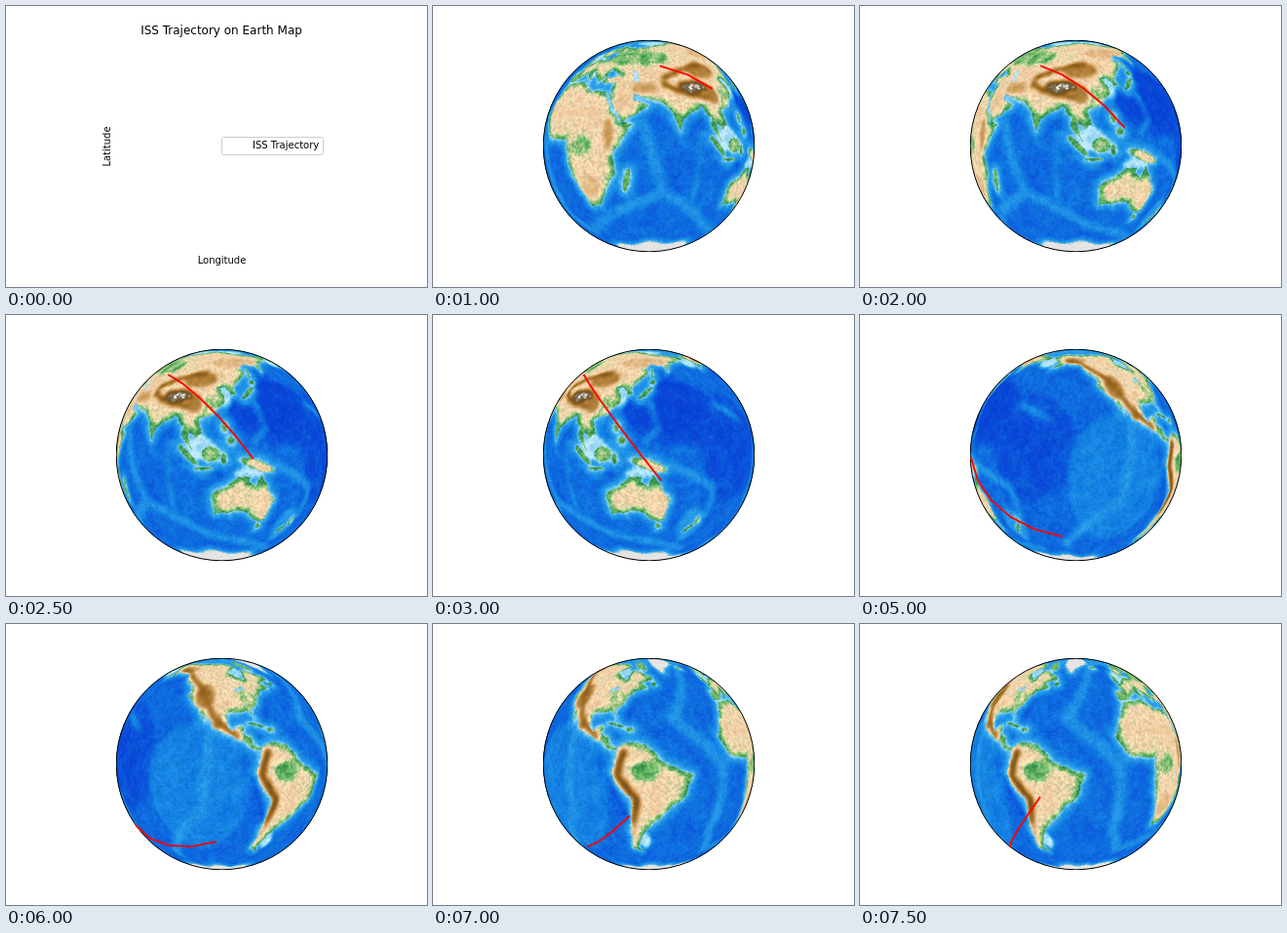
An HTML page with a canvas that plays this animation: 432x288 px, repeating every 8000 ms.

```html
<!DOCTYPE html>
<html lang="en">
<head>
<meta charset="utf-8">
<title>ISS Trajectory</title>
<style>
  html, body { margin: 0; width: 100%; height: 100%; overflow: hidden; background: #fff; }
  svg, canvas { position: absolute; left: 0; top: 0; }
  text { font-family: "DejaVu Sans", sans-serif; font-size: 10px; }
</style>
</head>
<body>
<canvas id="globe" width="432" height="288"></canvas>
<svg width="432" height="288" viewBox="0 0 432 288">
  <clipPath id="axes"><rect x="113" y="35" width="217" height="217"/></clipPath>
  <g id="labels">
    <text x="221" y="29" text-anchor="middle" style="font-size:12px">ISS Trajectory on Earth Map</text>
    <text x="221.5" y="264" text-anchor="middle">Longitude</text>
    <text transform="translate(107 144) rotate(-90)" text-anchor="middle">Latitude</text>
    <g id="legend">
      <rect x="221.5" y="134.5" width="104" height="18" rx="2" fill="#fff" stroke="#ccc"/>
      <text x="253" y="146">ISS Trajectory</text>
    </g>
  </g>
  <g id="overlay" clip-path="url(#axes)" fill="none">
    <circle cx="221.5" cy="143.5" r="108.3" stroke="#000"/>
    <path id="track" stroke="#f00" stroke-width="1.9" stroke-linejoin="round" stroke-linecap="square"/>
  </g>
</svg>
<script>
const RAD = Math.PI / 180, STEP = 500, STEPS = 16;
const CX = 221.5, CY = 143.5, R = 108.3;
const PX = 3, WEST = -40, TURN = 360 * PX, W = 400 * PX, H = 180 * PX;   // map texture, pixels per degree
const $ = id => document.getElementById(id);

function hash(x, y, seed) {
  let n = (x * 374761393 + y * 668265263 + seed * 69069) | 0;
  n = Math.imul(n ^ (n >>> 13), 1274126177);
  return ((n ^ (n >>> 16)) >>> 0) / 2 ** 32;
}

// Paths repeat after 360 degrees so the map wraps.
function addWrapped(target, path) {
  target.addPath(path);
  target.addPath(path, { a: 1, b: 0, c: 0, d: 1, e: 360, f: 0 });
  return target;
}
const wrapped = path => addWrapped(new Path2D(), path);
function ellipse(lon, lat, rx, ry, angle = 0) {
  const path = new Path2D();
  path.ellipse(lon, lat, rx, ry, angle * RAD, 2 * Math.PI, 0, true);
  return path;
}

// A few lon,lat corners become a ragged coast by midpoint displacement.
function coast(corners) {
  let pts = corners.split(" ").map(p => p.split(",").map(Number));
  for (let pass = 1; pass <= 3; pass++) {
    pts = pts.flatMap(([x, y], i) => {
      const [u, v] = pts[(i + 1) % pts.length];
      const s = (hash(Math.round(x * 10), Math.round(y * 10), pass) - 0.5) * 0.25 * Math.min(1, 8 / Math.hypot(u - x, v - y));
      return [[x, y], [(x + u) / 2 - (v - y) * s, (y + v) / 2 + (u - x) * s]];
    });
  }
  return new Path2D("M" + pts.join(" ") + "Z");
}

const eurasia = "-9,37 -9,43 -2,43.5 -4,48.5 8,54 11,54 21,55 29,60 22,60.5 25,65.5 17,62 14,55.5 6,58 5,62 25,71 40,67 33,66 60,69 104,77 140,72.5 190,66 163,60 157,51 156,58 142,59 135,54.5 140,51 127.5,39.5 129,35 126,35 121.5,40 118,39 122,31 114,22.5 106,20 109,12 105,9 100.5,13.5 104,1.5 98,9 98,15 92,22.5 80,15 77.5,8 72.5,20 66.5,25 50,30 51,25 59.5,22.5 45,13 35,28 36,36.5 27,37 28,41 41,41.5 31,46.5 23,37 13,45.5 16,38 9,44 -1,37.5";
const africa = "-6,35.8 10,37 20,31 32,31 37,20 43,12 51,12 40,-3 40.5,-15 35,-22 27,-34 19,-34.5 12,-17 9,-1 9,4 -8,4.5 -17,14.7 -9.5,32";
const australia = "114,-22 122,-18 130,-12 136,-12 135.5,-15 140.5,-17.6 142.5,-11 145.5,-15 153,-26 150,-37.5 146,-39 138,-34.5 131,-31.5 124,-33.5 115,-34";
const northAmerica = "-168,65.7 -156,71 -95,70 -82,67 -94,59 -80,52 -78,62 -65,58.5 -56,53 -66,50 -61,46 -70,43.5 -76,36 -81.5,31 -80,25.5 -83,30 -97,28 -97,21 -94,18 -87,21 -88,16 -83.5,15 -83,10 -77.5,8 -82,8 -95,16 -105,20 -113,31 -110,23 -118,34 -124,40 -124,48 -136,58.5 -150,60 -164,54.7 -158,59";
const southAmerica = "-77.5,9 -72,12 -62,10.5 -50,0 -35,-6 -39,-18 -48.5,-26 -58,-35 -65,-43 -69,-51 -66,-55 -74,-52 -71,-30 -70.3,-18 -76,-14 -81,-5 -78,2";
const greenland = "-60,82 -20,81 -22,71 -40,65 -44,60 -53,66 -58,75";
const islands = [
  [114, 0.5, 5, 4], [140, -5.5, 10, 2.6, -18], [101, 0, 7.5, 1.6, -45], [110, -7.4, 5, 0.8], [121, -2, 1.5, 3],
  [121.5, 15.5, 1.4, 3], [125, 8, 2, 2], [138, 36, 6, 1.3, 40], [143, 43.3, 2, 1.4], [142.7, 50, 0.8, 4],
  [175.5, -38.5, 1.3, 3], [170.5, -43.8, 4, 1.2, 42], [146.7, -42, 1.6, 1.5], [47, -19, 1.8, 6.5, -15],
  [-2.5, 53.5, 2, 4], [-19, 65, 4, 1.4], [-79.5, 21.7, 5, 0.7, -15], [-71, 19, 2.3, 0.9], [-72, 68, 11, 3, -30], [-56, 49, 2, 1.5]
];

const land = new Path2D(), caps = new Path2D();
for (const d of [eurasia, africa, australia, northAmerica, southAmerica]) addWrapped(land, coast(d));
for (const island of islands) addWrapped(land, ellipse(...island));
addWrapped(caps, coast(greenland));
let antarctica = "M-40,-90";
for (let lon = -40; lon <= 360; lon += 3)
  antarctica += ` ${lon},${-70.5 + 4.5 * Math.sin(lon * RAD) + 2 * Math.sin(lon * 0.13)}`;
caps.addPath(new Path2D(antarctica + " 360,-90Z"));

// Elevation is painted in greys: below 148 is sea, above is land.
const grey = v => `rgb(${v},${v},${v})`;
function layer(level) {
  const canvas = document.createElement("canvas");
  canvas.width = W; canvas.height = H;
  const c = canvas.getContext("2d", { willReadFrequently: true });
  if (level) { c.fillStyle = grey(level); c.fillRect(0, 0, W, H); }
  c.lineJoin = c.lineCap = "round";
  c.setTransform(PX, 0, 0, -PX, -WEST * PX, H / 2);
  return c;
}
function fill(c, path, level) { c.fillStyle = grey(level); c.fill(path); }
function stroke(c, path, level, width) { c.strokeStyle = grey(level); c.lineWidth = width; c.stroke(path); }
function line(c, level, width, d) { stroke(c, wrapped(new Path2D("M" + d)), level, width); }
function blob(c, level, ...shape) { fill(c, wrapped(ellipse(...shape)), level); }
function blend(c, source, blur) {
  c.save();
  c.setTransform(1, 0, 0, 1, 0, 0);
  c.filter = `blur(${blur}px)`;
  c.drawImage(source.canvas, 0, 0);
  c.restore();
}

function paintSea(map) {
  const sea = layer(72);
  blob(sea, 50, 155, 25, 30, 20);
  blob(sea, 58, 195, 5, 25, 30);
  blob(sea, 88, -115, -15, 30, 38);
  blob(sea, 110, 0, 78, 400, 9);
  blob(sea, 108, 170, -42, 8, 12);
  line(sea, 100, 7, "-25,62 -45,25 -15,0 -13,-40 0,-54 68,-26");
  line(sea, 98, 6, "57,13 68,-25 110,-49 180,-62");
  line(sea, 100, 3, "90,8 88,-30");
  line(sea, 106, 6, "-106,20 -112,-25 -150,-57");
  line(sea, 105, 2.5, "-176,29 -155,19");
  line(sea, 105, 3, "140,34 146,14 138,8");
  line(sea, 108, 4, "152,-5 180,-18 181,-34");
  stroke(sea, land, 104, 8);
  stroke(sea, caps, 100, 10);
  for (const trench of ["143,33 148,13", "145,40 160,50", "97,-1 120,-11", "-72,-33 -82,-8"]) line(sea, 38, 2, trench);
  blend(map, sea, 5);

  const shelf = layer();
  stroke(shelf, land, 138, 2.5);
  stroke(shelf, caps, 140, 3);
  const shallows = [[109, 4, 7, 7], [135, -10, 9, 3], [188, 60, 9, 5], [122, 33, 4, 6], [-62, -47, 4, 6], [-86, 60, 6, 5], [3, 56, 4, 5], [100, 75, 65, 4]];
  for (const s of shallows) blob(shelf, 145, ...s);
  blend(map, shelf, 3);
}

function paintRelief(map) {
  const relief = layer(179);
  stroke(relief, land, 153, 5);
  const regions = [
    [158, -62, -4, 8, 6], [160, 50, 57, 32, 8], [158, 20, 0, 7, 6], [162, 112, 28, 7, 6], [162, -82, 38, 7, 7],
    [182, 12, 23, 25, 7], [182, 46, 24, 8, 8], [188, 23, -22, 8, 9], [203, 37, 6, 3, 10], [203, 57, 33, 9, 4],
    [192, 135, 61, 25, 6], [213, 103, 46, 14, 6], [216, 103, 29, 5, 6], [247, 90, 34, 11, 4],
    [214, -112, 40, 7, 9], [212, -103, 23, 3, 5], [200, -140, 64, 14, 3], [200, 36, 39, 6, 1.5]
  ];
  for (const r of regions) blob(relief, ...r);
  line(relief, 242, 4, "-74,7 -78,-6 -67,-20 -70,-33");
  line(relief, 215, 2, "-70,-33 -73,-50");
  line(relief, 225, 4, "-150,62 -137,61 -115,46 -105,26 -91,15");
  line(relief, 238, 3, "70,36 80,31 98,27");
  line(relief, 232, 3, "70,40 88,47 107,51");
  line(relief, 192, 2, "146,-20 151,-28 147,-37");
  line(relief, 225, 1.6, "135,-4 147,-8");
  map.save();
  map.clip(land);
  blend(map, relief, 4);
  map.restore();
}

function elevation() {
  const map = layer(72);
  paintSea(map);
  fill(map, land, 153);
  paintRelief(map);
  blob(map, 140, 50.5, 41.5, 2, 5, 20);
  blob(map, 140, -87, 45, 4, 1.5, 20);
  fill(map, caps, 253);
  return map.getImageData(0, 0, W, H).data;
}

// Value noise, periodic in longitude.
function noise(x, y, cell) {
  const u = x / cell, v = y / cell, i = Math.floor(u), j = Math.floor(v), fu = u - i, fv = v - j;
  const next = (i + 1) % (TURN / cell);
  const mix = row => hash(i, row, cell) * (1 - fu) + hash(next, row, cell) * fu;
  return mix(j) * (1 - fv) + mix(j + 1) * fv - 0.5;
}

function colorRamp() {
  const c = document.createElement("canvas").getContext("2d"), gradient = c.createLinearGradient(0, 0, 256, 0);
  const stops = {
    0: "#0828b4", 50: "#0946d8", 85: "#127ee2", 115: "#2da2e9", 140: "#96d8f6", 147.9: "#b9e6fa",
    148: "#2d8a48", 159: "#73bc6c", 169: "#ded7a8", 182: "#f5d4ac", 205: "#c69652",
    225: "#96641e", 238: "#705224", 246: "#7d6e58", 251: "#e4e4e4"
  };
  for (const [v, color] of Object.entries(stops)) gradient.addColorStop(v / 256, color);
  c.fillStyle = gradient;
  c.fillRect(0, 0, 256, 1);
  return c.getImageData(0, 0, 256, 1).data;
}

function paintTexture() {
  const height = elevation(), ramp = colorRamp(), out = new Uint8ClampedArray(W * H * 3);
  for (let y = 0; y < H; y++) for (let x = 0; x < W; x++) {
    const p = y * W + x, v = height[p * 4], px = x % TURN, isLand = v > 147, isIce = v > 250;
    const fine = noise(px, y, 3), rough = fine * 0.4 + noise(px, y, 8) * 0.6 + noise(px, y, 24) * 0.5;
    const level = Math.round(v + rough * (isIce ? 2 : isLand ? 20 : 24));
    const index = isLand ? Math.min(255, Math.max(149, level)) : Math.min(147, Math.max(0, level));
    const light = 1 + fine * (isLand && !isIce ? 0.24 : 0.1);
    for (let c = 0; c < 3; c++) out[p * 3 + c] = ramp[index * 4 + c] * light;
  }
  return out;
}

const texture = paintTexture(), SIZE = 434;
const ball = document.createElement("canvas");
ball.width = ball.height = SIZE;
const ballCtx = ball.getContext("2d"), image = ballCtx.createImageData(SIZE, SIZE);
const globe = $("globe").getContext("2d");

// Orthographic view of the equator at lon0.
function drawGlobe(lon0) {
  image.data.fill(0);
  for (let j = 0; j < SIZE; j++) {
    const y = 1 - (2 * j + 1) / SIZE;
    const row = Math.min(H - 1, Math.floor((90 - Math.asin(y) / RAD) * PX)) * W;
    for (let i = 0; i < SIZE; i++) {
      const x = (2 * i + 1) / SIZE - 1, zz = 1 - x * x - y * y;
      if (zz < 0) continue;
      const lon = lon0 + Math.atan2(x, Math.sqrt(zz)) / RAD;
      const from = (row + Math.floor(((lon + 380) % 360 - 20 - WEST) * PX)) * 3, to = (j * SIZE + i) * 4;
      for (let c = 0; c < 3; c++) image.data[to + c] = texture[from + c];
      image.data[to + 3] = 255;
    }
  }
  ballCtx.putImageData(image, 0, 0);
  globe.imageSmoothingQuality = "high";
  globe.drawImage(ball, 113, 35, 217, 217);
}

// Circular orbit inclined by 51.6 degrees.
function station(k) {
  const u = (105.1 + 15.4 * k) * RAD, tilt = 51.6 * RAD;
  return {
    lat: Math.asin(Math.sin(tilt) * Math.sin(u)),
    lon: Math.atan2(Math.cos(tilt) * Math.sin(u), Math.cos(u)) - (43.5 + 0.15 * k) * RAD
  };
}
function trackPath(step, lon0) {
  const points = [];
  for (let k = 0; k <= step; k++) {
    const { lat, lon } = station(k), d = lon - lon0 * RAD;
    if (Math.cos(d) < 0) continue;
    const x = CX + R * Math.cos(lat) * Math.sin(d), y = CY - R * Math.sin(lat);
    points.push(x.toFixed(2) + "," + y.toFixed(2));
  }
  return "M" + points.join(" ");
}

function render(step) {
  const started = step >= 2, lon0 = 20 + 20 * step;
  $("labels").style.display = started ? "none" : "";
  $("overlay").style.display = started ? "" : "none";
  $("legend").setAttribute("transform", step === 1 ? "translate(-103 -94)" : "");
  globe.clearRect(0, 0, 432, 288);
  if (!started) return;
  drawGlobe(lon0);
  $("track").setAttribute("d", trackPath(step, lon0));
}

let shown = -1, start;
function tick(now) {
  start ??= now;
  const step = Math.floor((now - start) / STEP) % STEPS;
  if (step !== shown) render(shown = step);
  requestAnimationFrame(tick);
}
requestAnimationFrame(tick);
</script>
</body>
</html>
```
